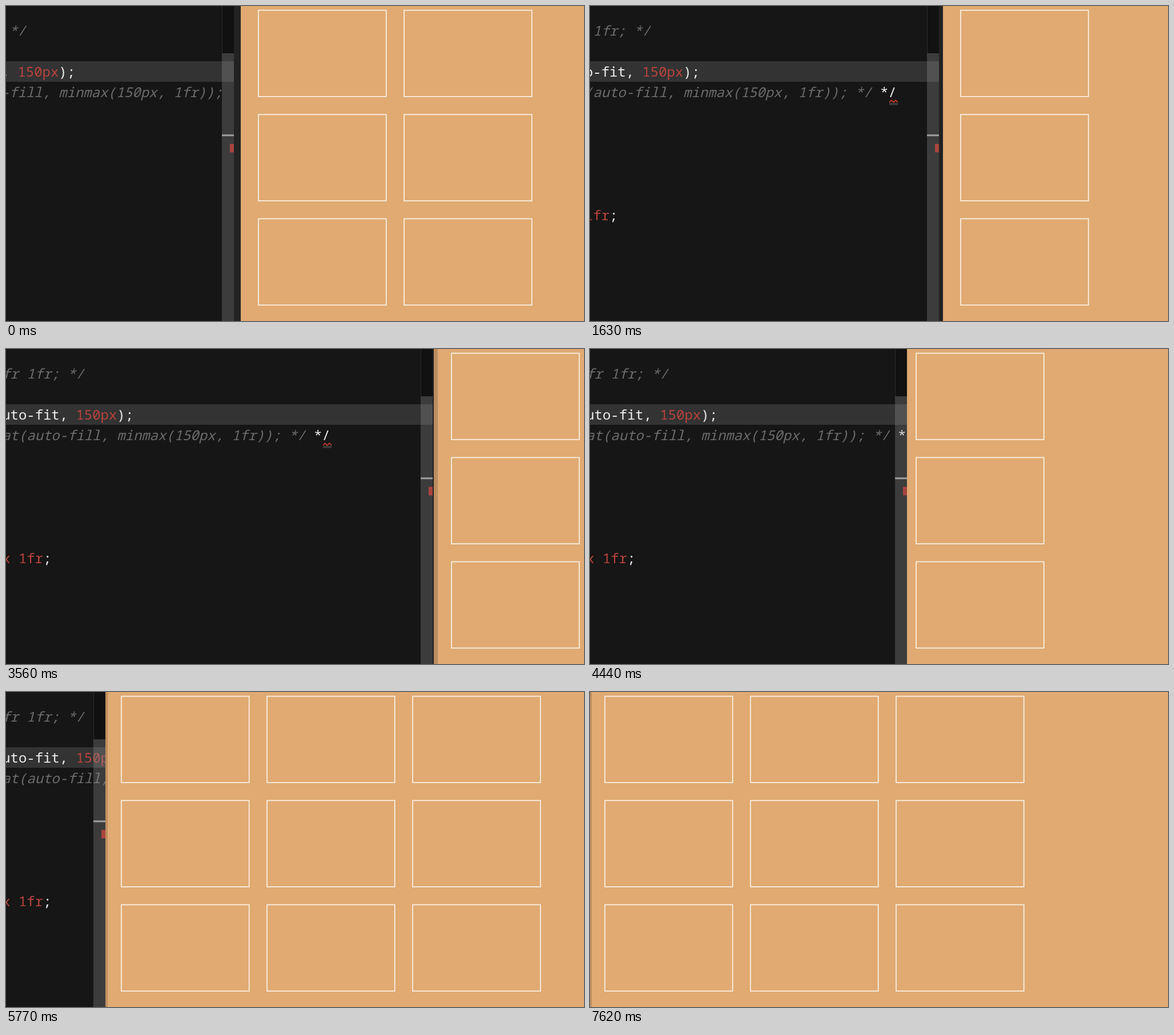
Animation, 1012 px wide and 553 px high, one loop 7720 ms. Source, as an HTML page with a canvas:

```html
<!DOCTYPE html>
<html lang="en">
<head>
<meta charset="utf-8">
<title>Resizing an auto-fit grid</title>
<style>
  html, body { margin: 0; width: 100%; height: 100%; overflow: hidden; background: #e0aa72; }
  canvas { display: block; }
</style>
</head>
<body>
<canvas id="stage" width="1012" height="553"></canvas>
<script>
const WIDTH = 1012, HEIGHT = 553, LOOP = 7720, STEP = 147.9;
const ctx = document.getElementById('stage').getContext('2d');

// Drag strokes: first step, then the page's left edge on successive steps
const strokes = [
  [0, 411, 427, 443, 458],
  [5, 487, 512],
  [8, 546, 570, 595, 618, 632, 645, 658, 671, 708, 735, 754, 766, 773, 776],
  [23, 764, 749],
  [27, 726, 678, 613, 540, 487],
  [33, 418, 380],
  [36, 300, 262],
  [39, 171],
  [42, 113],
  [44, 106],
  [46, 78, 56, 35, 17, 4],
  [51.5, -5]
];
const poses = strokes.flatMap(([first, ...lefts]) =>
  lefts.map((left, i) => ({ step: first + i, left })));

// How far the editor overlaps the page, and the width of the drag shadow
const overlaps = [
  [0, -12, 0], [1, -5, 0], [11, -7, 0], [12, -5, 0], [16, -3, 0],
  [23, -2, 7], [27, 11, 0], [30, 15, 0], [31, 0, 0], [33, 4, 0],
  [37, 0, 3], [39, 3, 4], [42, 2, 3], [51.5, 5, 3]
];

const CELL = 14.36, GRID_X = 7.6;
const GREY = '#6b6b6b', WHITE = '#eeeeee', RED = '#b8433e';
// Column, baseline, colour, text, italic
const code = [
  [-1, 52, GREY, 'fr 1fr; */', true],
  [-1, 124, WHITE, 'uto-fit,'],
  [8, 124, RED, '150px'],
  [13, 124, WHITE, ');'],
  [-1, 160, GREY, 'at(auto-fill, minmax(150px, 1fr)); */', true],
  [37, 160, WHITE, '*/'],
  [-1, 376, RED, 'x 1fr'],
  [4, 376, WHITE, ';']
];

function fill(color, x, y, w, h) {
  ctx.fillStyle = color;
  ctx.fillRect(x, y, w, h);
}

function drawCode(shift) {
  for (const [column, y, color, text, italic] of code) {
    ctx.font = `${italic ? 'italic ' : ''}500 ${CELL / 0.6}px "Noto Sans Mono", "DejaVu Sans Mono", monospace`;
    ctx.fillStyle = color;
    ctx.fillText(text, GRID_X + column * CELL + shift, y);
  }
  // Error mark below the stray comment end
  const x = 555 + shift;
  fill('#3a3a3a', x, 170, 15, 4);
  ctx.strokeStyle = '#c0392b';
  ctx.lineWidth = 1.8;
  ctx.beginPath();
  for (let i = 0; i <= 4; i++) ctx.lineTo(x + i * 3.75, i % 2 ? 165.5 : 169);
  ctx.stroke();
}

function drawEditor(right, shift) {
  const bar = right - 21;
  ctx.save();
  ctx.beginPath();
  ctx.rect(0, 0, Math.max(0, right), HEIGHT);
  ctx.clip();
  fill('#161616', 0, 0, right, HEIGHT);
  fill('#333333', 0, 97, right, 36);
  drawCode(shift);
  fill('#111111', bar, 0, 21, 83);
  fill('#2b2b2b', bar, 0, 1, 83);
  fill('rgba(150,150,150,.3)', bar, 83, 21, HEIGHT - 83);
  fill('#a0a0a0', bar, 225.5, 21, 3);
  fill('#a8443f', bar + 14, 242, 7, 15);
  ctx.restore();
}

function drawPage(left) {
  const columns = Math.max(1, Math.floor((1005 - left) / 255));
  ctx.strokeStyle = '#fcf2e7';
  ctx.lineWidth = 1.7;
  for (let row = 0; row < 3; row++)
    for (let col = 0; col < columns; col++)
      ctx.strokeRect(left + 31 + col * 255, 7.5 + row * 183, 223.7, 151.5);
}

function draw(time) {
  const step = (time + 5) / STEP;
  const past = poses.filter(pose => pose.step <= step);
  const { left } = past[past.length - 1];
  const [, overlap, shadow] = overlaps.filter(([first]) => first <= step).pop();
  const right = left + overlap;
  // The code scrolls back only while the editor grows to a new widest size
  const widest = Math.max(...past.map(pose => pose.left)) - 7;
  const shift = Math.min(0, Math.max(-102, widest - 642));
  const edge = Math.max(left, right);

  fill('#e0aa72', 0, 0, WIDTH, HEIGHT);
  drawPage(left);
  fill('#222222', 0, 0, edge, HEIGHT);
  drawEditor(right, shift);
  fill('#bd8d5f', edge, 0, shadow, HEIGHT);
}

function tick() {
  draw(performance.now() % LOOP);
  requestAnimationFrame(tick);
}
tick();
</script>
</body>
</html>
```
